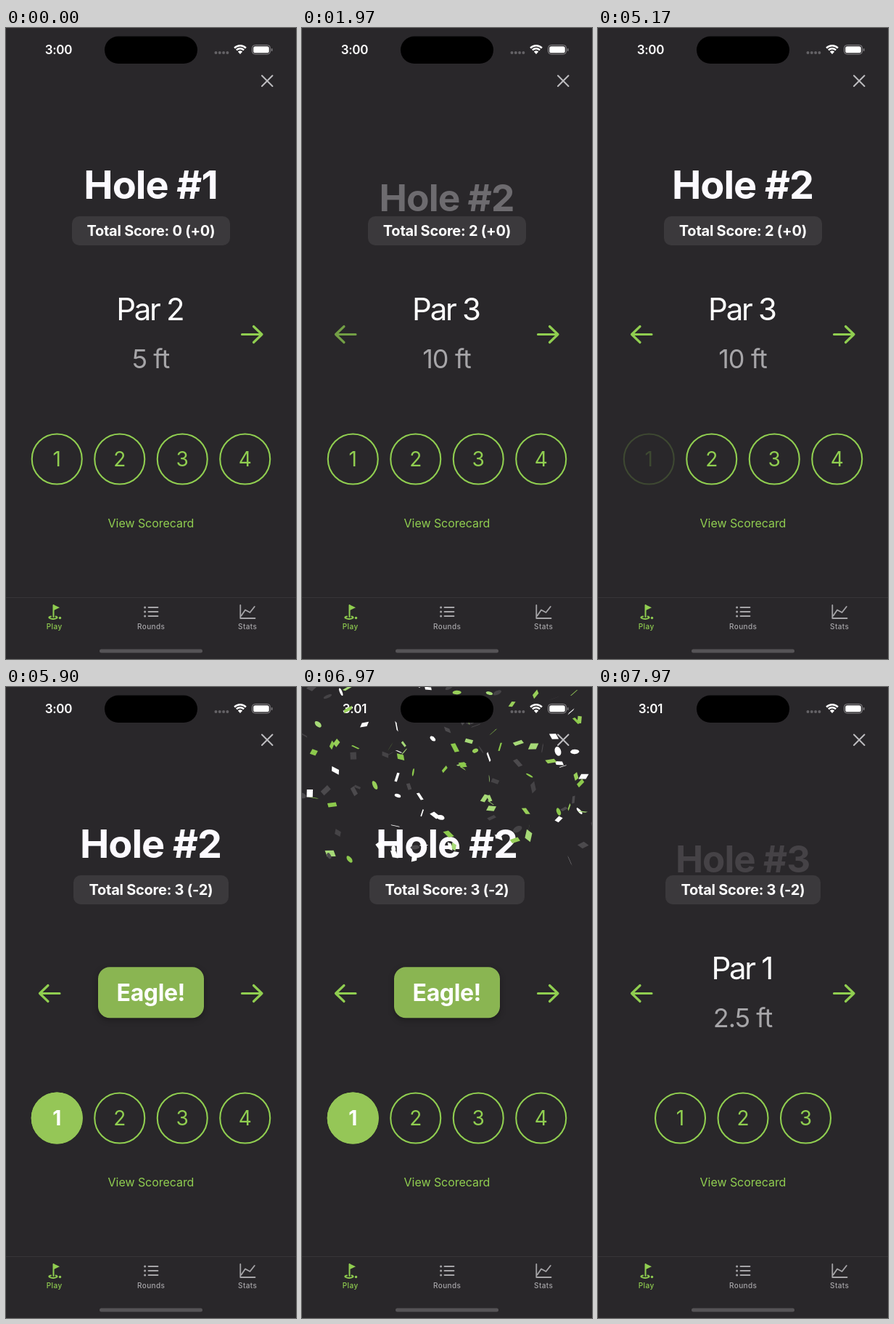
Recreate the animation shown at these times as an HTML page with a canvas. Size 400x868 px, loop 8 s.

```html
<!DOCTYPE html>
<html lang="en">
<head>
<meta charset="utf-8">
<title>Mini golf round</title>
<style>
  html, body { margin: 0; width: 100%; height: 100%; overflow: hidden; background: #29272a; }
  canvas { display: block; width: 100vw; height: 100vh; }
</style>
</head>
<body>
<canvas></canvas>
<script>
const canvas = document.querySelector('canvas');
const ctx = canvas.getContext('2d');
const LOOP = 8000;
const GREEN = '#90ce50', BACKGROUND = '#29272a', GREY = '#a6a5a8';

const holes = [
  { start: -5000, par: 2, distance: '5 ft', options: 4, tap: 500, choice: 2, result: 'Par' },
  { start: 1700, par: 3, distance: '10 ft', options: 4, tap: 5170, choice: 1, result: 'Eagle!' },
  { start: 7770, par: 1, distance: '2.5 ft', options: 3, tap: Infinity }
];
const PRESS = 70;

const ramp = (t, start, length) => Math.min(1, Math.max(0, (t - start) / length));
const smooth = p => p * p * (3 - 2 * p);
const random = (i, k) => {
  const v = Math.sin(i * 12.9898 + k * 78.233) * 43758.5453;
  return v - Math.floor(v);
};
// A pressed button drops to 20% at once and recovers after release.
const pressAlpha = (t, at) => t < at ? 1 : 0.2 + 0.8 * ramp(t, at + PRESS, 120);

function layer(alpha, draw, x = 0, y = 0, scale = 1) {
  if (alpha <= 0) return;
  ctx.save();
  ctx.globalAlpha *= alpha;
  ctx.translate(x, y);
  ctx.scale(scale, scale);
  draw();
  ctx.restore();
}

function text(value, x, y, size, weight, color, spacing = 0) {
  ctx.font = `${weight} ${size}px Inter, sans-serif`;
  ctx.letterSpacing = spacing + 'px';
  ctx.textAlign = 'center';
  ctx.fillStyle = color;
  ctx.fillText(value, x + spacing / 2, y);
}

function box(x, y, w, h, r, color) {
  ctx.fillStyle = color;
  ctx.beginPath();
  ctx.roundRect(x, y, w, h, r);
  ctx.fill();
}

function dot(x, y, r, color) {
  ctx.fillStyle = color;
  ctx.beginPath();
  ctx.arc(x, y, r, 0, 7);
  ctx.fill();
}

function stroke(path, color, width) {
  ctx.strokeStyle = color;
  ctx.lineWidth = width;
  ctx.lineCap = ctx.lineJoin = 'round';
  ctx.stroke(new Path2D(path));
}

function statusBar(t) {
  text(t < 6700 ? '3:00' : '3:01', 72.6, 36, 17, 600, '#fff', -0.3);
  for (let i = 0; i < 4; i++) dot(289.5 + i * 5.3, 34, 2, '#656367');
  ctx.strokeStyle = '#fff';
  ctx.lineWidth = 2.5;
  ctx.lineCap = 'butt';
  for (const r of [11.2, 7.2]) {
    ctx.beginPath();
    ctx.arc(323, 35.5, r, -Math.PI * 0.75, -Math.PI * 0.25);
    ctx.stroke();
  }
  ctx.fillStyle = '#fff';
  ctx.fill(new Path2D('M323 36L319.8 32.6Q323 30 326.2 32.6Z'));
  ctx.strokeStyle = '#8b898c';
  ctx.lineWidth = 1;
  ctx.beginPath();
  ctx.roundRect(339.5, 23.5, 25, 12.5, 4);
  ctx.stroke();
  box(341.2, 25.2, 21.6, 9.1, 2.6, '#fff');
  box(366, 28, 1.4, 4, 1, '#8b898c');
}

function tabBar() {
  ctx.fillStyle = '#373538';
  ctx.fillRect(0, 783, 400, 1);

  stroke('M65.5 794V810', GREEN, 2);
  ctx.fillStyle = GREEN;
  ctx.fill(new Path2D('M65 793L74 797.3L65 801.5Z'));
  stroke('M62 809.5Q58.5 810 59.5 811.5Q65 814.5 70.5 811.5Q71 810 68.5 809.5', GREEN, 1.8);
  dot(74.5, 811.5, 1.7, GREEN);

  for (const y of [797, 803, 809]) {
    dot(191.6, y, 1.5, GREY);
    stroke(`M196.5 ${y}H209.5`, GREY, 1.8);
  }
  stroke('M323.3 794V812H343.5M324.5 808.5L330 800.5L336.5 804L342.8 796', GREY, 1.8);

  text('Play', 66.5, 827, 10, 500, GREEN, 0.4);
  text('Rounds', 200, 827, 10, 500, GREY, 0.4);
  text('Stats', 333, 827, 10, 500, GREY, 0.4);
  box(129, 854.5, 142, 5, 2.5, '#565457');
}

function title(t, number, start, end) {
  const enter = smooth(ramp(t, start + 90, 600));
  const fade = Math.min(1, enter * 1.5);
  const leave = ramp(t, end + 50, 130);
  layer(fade * (1 - leave), () => text('Hole #' + number, 0, 19, 54, 700, '#fcfaff', -1),
    200, 216 + 23 * (1 - enter) - 38 * leave, 0.94 + 0.06 * enter - 0.08 * leave);
}

function scorePill(t) {
  const score = t < 570 ? '0 (+0)' : t < 5240 ? '2 (+0)' : '3 (-2)';
  const width = t < 5240 ? 218 : 214;
  box(200 - width / 2, 259, width, 40, 10, '#3b393c');
  text('Total Score: ' + score, 200, 286.3, 20, 700, '#fff', -0.25);
}

function badge(label, amount) {
  layer(amount, () => {
    const width = label === 'Par' ? 101 : 146;
    ctx.shadowColor = 'rgba(0,0,0,.3)';
    ctx.shadowBlur = 8;
    ctx.shadowOffsetY = 3;
    box(-width / 2, -35, width, 70, 16, '#8ab552');
    ctx.shadowColor = 'transparent';
    text(label, 0, 12, 32, 700, '#fff', -0.4);
  }, 200, 420.2, 0.7 + 0.3 * amount);
}

function options(t, hole) {
  const selected = smooth(ramp(t, hole.tap + PRESS, 180));
  for (let i = 1; i <= hole.options; i++) {
    const chosen = i === hole.choice;
    const x = 200 + (i - (hole.options + 1) / 2) * 86.5;
    layer(chosen ? pressAlpha(t, hole.tap) : 1, () => {
      ctx.strokeStyle = GREEN;
      ctx.lineWidth = 2.1;
      ctx.beginPath();
      ctx.arc(0, 0, 34.5, 0, 7);
      ctx.stroke();
      text(i, 0, 10, 28, 400, GREEN);
    }, x, 593);
    if (chosen) layer(selected, () => {
      dot(0, 0, 35.5, '#95c657');
      text(i, 0, 10, 28, 700, '#fff');
    }, x, 593);
  }
}

function confetti(t) {
  const age = (t - 5980) / 1000;
  if (age <= 0 || t > 7700) return;
  const front = 256 * (1 - Math.exp(-2.8 * age));
  const colors = ['#98cf59', '#a6d977', '#8cc94c', '#ffffff', '#ffffff', '#4c4a4d', '#454346'];
  layer(1 - ramp(t, 7100, 600), () => {
    for (let i = 1; i <= 135; i++) {
      const y = front - random(i, 1) * 255;
      if (y < -8) continue;
      const x = random(i, 2) * 400 + 10 * Math.sin(age * 3 + i);
      const width = 8 + random(i, 3) * 5, height = 5 + random(i, 4) * 4;
      ctx.save();
      ctx.translate(x, y);
      ctx.rotate(random(i, 5) * 7 + age * (random(i, 6) - 0.5) * 8);
      ctx.transform(1, 0, random(i, 7) - 0.5, Math.cos(i + age * (3 + random(i, 8) * 5)), 0, 0);
      ctx.fillStyle = colors[i % colors.length];
      ctx.beginPath();
      if (random(i, 9) < 0.33) ctx.ellipse(0, 0, width / 2, height / 2, 0, 0, 7);
      else ctx.rect(-width / 2, -height / 2, width, height);
      ctx.fill();
      ctx.restore();
    }
  });
}

function render(t) {
  const index = holes.findLastIndex(hole => t >= hole.start + PRESS);
  const hole = holes[index], previous = holes[index - 1];
  const shown = ramp(t, hole.start + PRESS, 100);
  const scored = smooth(ramp(t, hole.tap + PRESS, 200));

  ctx.fillStyle = BACKGROUND;
  ctx.fillRect(0, 0, 400, 868);
  statusBar(t);
  stroke('M353 65.5L367.5 80M367.5 65.5L353 80', '#bebdc0', 2);

  holes.forEach((h, i) => title(t, i + 1, h.start, holes[i + 1] ? holes[i + 1].start : Infinity));
  scorePill(t);

  layer(shown * (1 - scored), () => {
    text('Par ' + hole.par, 199.5, 401.5, 42, 400, '#fff', -2.3);
    text(hole.distance, 200, 467.5, 36, 400, GREY, -0.9);
  });
  if (previous) badge(previous.result, 1 - shown);
  if (hole.result) badge(hole.result, scored);

  const lastTap = holes[2].start <= t ? holes[2].start : holes[1].start;
  layer(pressAlpha(t, lastTap), () =>
    stroke('M325.5 421.5H353M341.5 410.5L353 421.5L341.5 432.5', GREEN, 3.2));
  layer(ramp(t, 1790, 250), () =>
    stroke('M74 421.5H46.5M58 410.5L46.5 421.5L58 432.5', GREEN, 3.2));

  options(t, hole);
  text('View Scorecard', 200, 687, 16, 400, GREEN, -0.05);
  tabBar();
  confetti(t);
  box(136, 11.5, 128, 37.5, 18.75, '#000');
}

function frame() {
  const ratio = window.devicePixelRatio || 1;
  const width = Math.round(innerWidth * ratio), height = Math.round(innerHeight * ratio);
  if (canvas.width !== width || canvas.height !== height) {
    canvas.width = width;
    canvas.height = height;
  }
  ctx.setTransform(width / 400, 0, 0, height / 868, 0, 0);
  render(performance.now() % LOOP);
  requestAnimationFrame(frame);
}
frame();
</script>
</body>
</html>
```
